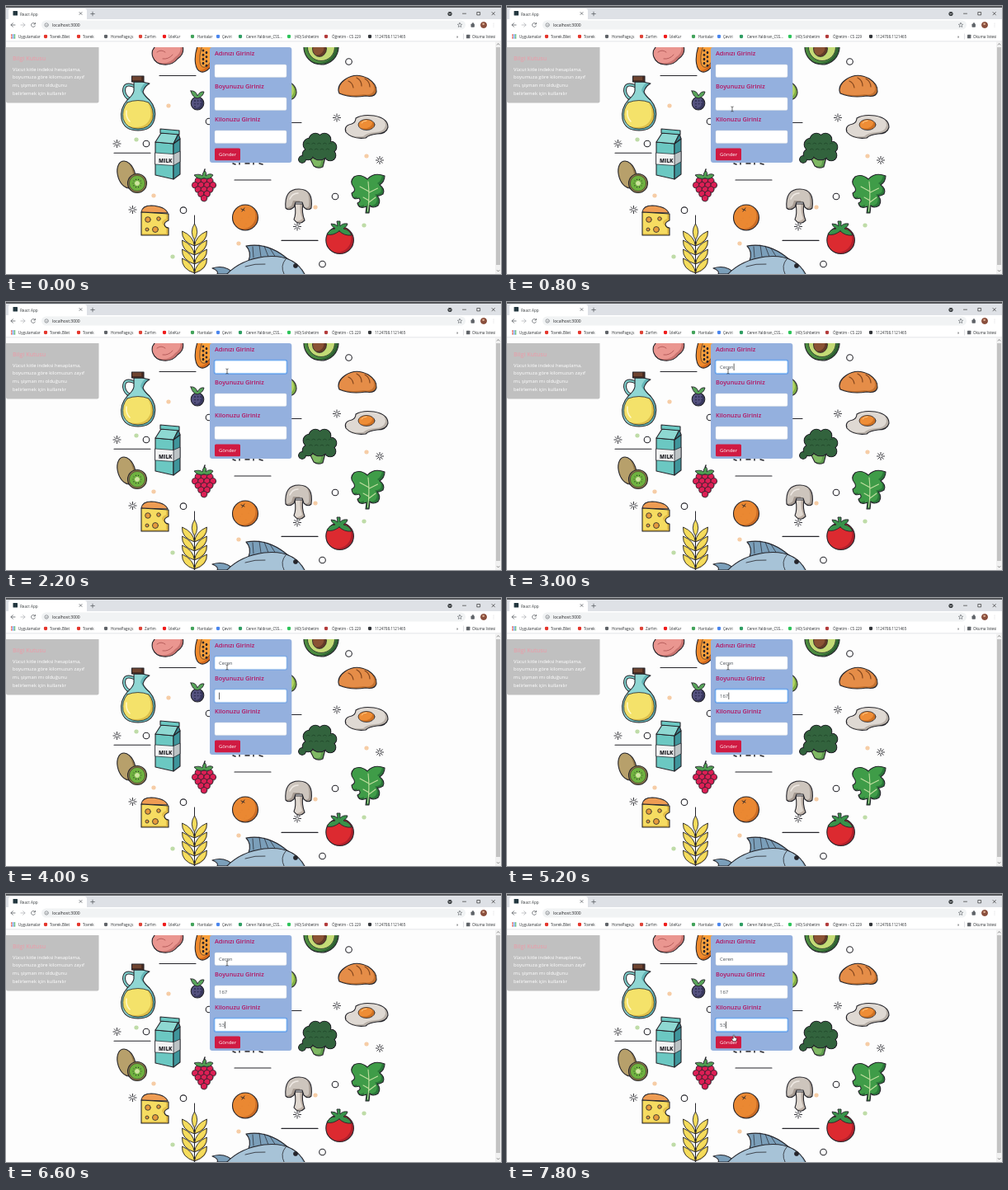
An HTML page with a canvas that plays this animation: 600x325 px, repeating every 8000 ms.

```html
<!DOCTYPE html>
<html lang="tr">
<head>
<meta charset="utf-8">
<title>React App</title>
<style>
html, body { margin: 0; width: 100%; height: 100%; overflow: hidden; background: #fff; }
canvas, svg { position: absolute; left: 0; top: 0; width: 600px; height: 325px; }
text { font-family: "Open Sans", "Noto Sans", sans-serif; white-space: pre; }
</style>
</head>
<body>
<canvas id="page"></canvas>
<svg id="ui" viewBox="0 0 600 325"></svg>
<script>
const INK = '#25252b';
const canvas = document.getElementById('page');
const ui = document.getElementById('ui');
const dpr = window.devicePixelRatio || 1;
canvas.width = 600 * dpr;
canvas.height = 325 * dpr;
const c = canvas.getContext('2d');
c.scale(dpr, dpr);

// ---------- drawing helpers ----------
function rect(x, y, w, h, fill, r = 0) {
  c.fillStyle = fill;
  c.beginPath();
  c.roundRect(x, y, w, h, r);
  c.fill();
}
function line(d, color = INK, width = 1.1) {
  c.strokeStyle = color;
  c.lineWidth = width;
  c.lineCap = c.lineJoin = 'round';
  c.stroke(new Path2D(d));
}
function paint(p, fill, dark, width = 1.1, dx = 3, dy = 2) {
  c.save();
  c.clip(p);
  c.fillStyle = dark || fill;
  c.fill(p);
  if (dark) {
    c.translate(-dx, -dy);
    c.fillStyle = fill;
    c.fill(p);
  }
  c.restore();
  if (!width) return;
  c.strokeStyle = INK;
  c.lineWidth = width;
  c.lineJoin = 'round';
  c.stroke(p);
}
const shape = (d, ...style) => paint(new Path2D(d), ...style);
function oval(x, y, rx, ry, turn, ...style) {
  const p = new Path2D();
  p.ellipse(x, y, rx, ry, turn, 0, 7);
  paint(p, ...style);
}
const dot = (x, y, r, fill) => oval(x, y, r, r, 0, fill, null, 0);
const ring = (x, y) => oval(x, y, 3.8, 3.8, 0, '#fff');
function star(x, y) {
  for (let i = 0; i < 8; i++) {
    const a = i * Math.PI / 4, u = Math.cos(a), v = Math.sin(a);
    line(`M${x + u * 1.6} ${y + v * 1.6}L${x + u * 4.6} ${y + v * 4.6}`, INK, 0.9);
  }
}
function cluster(balls, fill) {
  for (const [x, y, r] of balls) dot(x, y, r + 0.6, INK);
  for (const [x, y, r] of balls) dot(x, y, r - 0.5, fill);
}

// ---------- food wallpaper ----------
function produce() {
  // sausage
  shape('M178 62Q175 54 182 48H214Q217 58 208 64Q202 72 191 71Q181 70 178 62Z', '#ea9690', '#c9736f');
  line('M183 56q5-4 10 0M190 64q7 1 12-5', '#a9504f', 0.8);
  // papaya
  oval(244, 54, 13, 27, 0.3, '#f08a2c', '#d56a1c');
  oval(245, 54, 8.5, 21, 0.3, '#f9a03c', null, 0.6);
  for (let i = 0; i < 8; i++) oval(239 + i % 2 * 4, 54 + i * 2.6, 1.6, 1.8, 0, '#2f2729', null, 0);
  // avocados
  oval(382, 50, 21, 21, 0.2, '#4b8b3f', '#2f6332');
  oval(382, 50, 16.5, 16.5, 0.2, '#c4db76', null, 0.7);
  oval(380, 52, 8.5, 9.5, 0, '#8a5334', '#633a27', 0.8);
  oval(339, 102.5, 13.5, 11, 0.5, '#b5d661', '#7fae45');
  // blackberry
  oval(232, 118, 7.8, 8, 0, '#55527f', '#39385f');
  for (let i = 0; i < 7; i++) dot(229 + i % 3 * 3.6, 115 + (i / 3 | 0) * 3.6, 1.2, '#343359');
  shape('M224 103q6-1 8 6q3-6 8-5q-1 6-8 8q-6-1-8-9Z', '#58a45a', null, 0.9);
  // kiwi
  oval(146, 204.5, 10.5, 17, -0.3, '#b7a06b', '#93794a');
  oval(159, 215, 11.5, 11.5, 0, '#8f7a4a', null);
  oval(159, 215, 9.6, 9.6, 0, '#6fb23f', null, 0.5);
  dot(159, 215, 3, '#cfe4a0');
  for (let i = 0; i < 10; i++) dot(159 + 5 * Math.cos(i * 0.63), 215 + 5 * Math.sin(i * 0.63), 0.8, INK);
  // raspberry
  line('M240 207q-1-5 1-9', INK, 1.6);
  [3, 4, 3, 2, 1].forEach((n, row) => {
    for (let i = 0; i < n; i++)
      oval(240 + (i - (n - 1) / 2) * 7.2, 212 + row * 5.3, 3.8, 3.8, 0, '#dd1f55', '#ac1442', 0.8, 1, 1);
  });
  shape('M240 209q-8 2-12-4q7-2 10 1q0-4 3-6q3 2 1 6q5-4 9-1q-3 6-11 4Z', '#4f9f52', null, 0.9);
  // orange
  oval(290, 256.5, 15.5, 15.5, 0, '#ea8832', '#c86b25');
  line('M285 246l4 2M289 245l-3 4', INK, 0.9);
  for (let i = 0; i < 8; i++) dot(281 + i * 5 % 17, 250 + i * 7 % 18, 0.5, '#a9551a');
  // tomato
  oval(404.6, 284, 16.8, 16.5, 0, '#dc2a30', '#b01f2a');
  shape('M404 273q-8 6-15 4q3-7 10-7q-5-3-5-6q6 0 8 3l-1-6h4l0 6q3-4 9-3q0 3-5 6q7 1 10 8q-9 1-15-5Z', '#38924a', null, 0.9);
  // broccoli
  shape('M366 180l7 14q5 4 11 1l4-15l-12-7Z', '#7fb863', '#5c9a4d');
  cluster([[359, 186, 4.5], [368, 168, 8], [375, 162, 8], [386, 162, 8], [394, 171, 7], [393, 181, 7], [380, 176, 11], [366, 180, 7]], '#32633d');
  for (let i = 0; i < 9; i++) line(`M${364 + i * 3.4} ${167 + i * 7 % 14}q2-2 4 0`, '#1f4429', 0.8);
  // leafy green
  shape('M436 251L437 243Q428 247 426 239Q431 237 428 233Q420 236 419 227Q425 224 421 219Q416 213 422 207Q430 203 438 210Q446 201 459 206Q459 213 453 217Q460 222 457 228Q452 231 450 230Q455 236 451 242Q445 246 441 242L440 251Z', '#3f9c48', '#2a7639');
  line('M438.5 249Q441 230 439 213M440 238l8-6M440 236l-7-4M440.5 226l10-5M440 225l-11-6', '#c1dfa0', 1.1);
}
function pantry() {
  // oil jug
  line('M155 97Q143 92 143 103Q144 110 150 113', INK, 4);
  line('M155 97Q143 92 143 103Q144 110 150 113', '#7fcfcb', 2);
  shape('M155 92H165L174 94Q168 97 166 104Q167 108 174 114Q183 124 180 137Q177 151 160 151Q143 151 140 137Q138 124 147 114Q154 108 155 103Z', '#8fd6d3', '#63b5b7');
  shape('M147 117Q160 112 173 117Q180 125 178 137Q174 149 160 149Q146 149 142 137Q140 125 147 117Z', '#f4e26a', '#dcc04a', 0.8);
  line('M146 127q-1 8 4 13', '#fff7c4', 1.6);
  shape('M152.5 85H167V92H152.5Z', '#6f4430', '#4a2c22');
  // milk carton
  shape('M181 165L203 167V210L181 205Z', '#6bc8c2');
  shape('M203 167L211 161V204L203 210Z', '#3f959b');
  shape('M181 165L188 154L209 155L203 167Z', '#8ed8d2');
  shape('M203 167L209 155L211 161Z', '#39878e');
  shape('M187 149L210 151V156L187 154Z', '#6bc8c2');
  shape('M203 179.5L211 176V189L203 193.5Z', '#bcc3c5', null, 0.7);
  shape('M181 178L203 179.5V193.5L181 192Z', '#f2f3f3', null, 0.7);
  // bread
  shape('M404 106Q400 97 411 89Q424 80 439 88Q450 95 449 104Q447 111 436 109Q418 112 404 106Z', '#e58d48', '#c2702f');
  line('M415 91q5 2 6 8M425 87q6 3 6 10M435 88q6 4 6 10', '#84471e', 1.2);
  // fried egg
  shape('M412 153Q409 145 419 143Q424 141 424 136Q432 131 446 133Q463 136 463 147Q461 155 450 155Q440 156 436 160Q420 162 412 153Z', '#dfd9d3', '#b9b1a9');
  oval(437, 144, 10, 6.5, 0, '#ee8d36', '#cf7122', 0.8);
  line('M431 142q2-3 6-3', '#ffcf8c', 1);
  // mushroom
  shape('M350 240Q352 252 349 259Q355 267 362 260Q358 250 360 240Z', '#e0d8d0', '#bdb0a6');
  shape('M339 245Q337 222 355 222Q373 222 370 245Q366 249 361 244L359 238H351L349 244Q343 249 339 245Z', '#cdc5bd', '#a69b92');
  line('M344 234q3-7 10-7', '#efe9e4', 1.5);
  // cheese
  shape('M164 250Q165 242 176 242Q193 243 196 251Z', '#ee9c53');
  shape('M164 250L197 252V260Q192 262 192 265Q193 269 197 269V278H164Z', '#f6dc61', '#e2bd48');
  for (const [x, y, r] of [[172, 259, 3.3], [185, 258, 2.3], [181, 271, 3.5], [171, 271, 2]])
    oval(x, y, r, r, 0, '#e59b3d', null, 0.8);
  // wheat
  line('M228.5 325V254', INK, 1);
  for (let y = 311; y > 271; y -= 11) for (const s of [-1, 1]) {
    const x = k => 228.5 + s * k;
    shape(`M${x(0)} ${y + 13}Q${x(1)} ${y + 1} ${x(15)} ${y - 5}Q${x(16)} ${y + 8} ${x(0)} ${y + 13}Z`, '#f5dc5c', '#d9b53c', 0.9, 1, 1);
  }
  shape('M228.5 284Q222 274 228.5 264Q235 274 228.5 284Z', '#f5dc5c', null, 0.9);
  // fish
  shape('M294 309Q298 298 291 291Q318 286 343 308Z', '#7b9fba', '#61859f');
  line('M300 305l-1-13M309 304l-2-14M318 304l-5-13M327 305l-7-11', INK, 0.7);
  shape('M250 318Q266 313 277 325H256Q258 321 250 318Z', '#7b9fba');
  shape('M266 327Q283 308 313 304Q350 300 363 327Z', '#a7c3d7', '#86a8c0');
  line('M339 307q-7 8-2 18M290 316q12-4 24-3', INK, 0.8);
  oval(351, 315, 2.6, 2.6, 0, INK, null, 0.8);
}
function wallpaper() {
  c.save();
  c.beginPath();
  c.rect(0, 50, 593, 275);
  c.clip();
  for (const [x, y] of [[197, 121], [437, 182], [179, 230], [282, 288], [375, 244]]) dot(x, y, 2.8, '#f6cda6');
  for (const [x, y] of [[202, 304], [434, 266], [158, 162]]) dot(x, y, 2.8, '#bfdca8');
  line('M186 84.5H230M131 178.3H175M277 211H321M334 284.4H378M320 141.5H358');
  line('M275 191l3 1M283 190v2M290 191h5M300 190v2M307 191l4 1', INK, 1.5);
  produce();
  pantry();
  for (const [x, y] of [[415.5, 67.5], [170, 167], [215, 247.7], [399, 231], [383.5, 313], [246, 140]]) ring(x, y);
  for (const [x, y] of [[134.5, 167], [153.5, 247], [401, 135.5], [453, 187], [353, 267.5]]) star(x, y);
  c.restore();
}

// ---------- browser window ----------
function browser() {
  const gray = '#5f6368';
  rect(0, 0, 600, 16, '#dee1e6');
  rect(0, 0, 600, 2, '#55575b');
  rect(3, 3, 95, 14, '#fff', [3, 3, 0, 0]);
  rect(8.5, 6, 5.5, 5.5, '#23373f', 0.5);
  line('M89 7.5l3 3M92 7.5l-3 3M102.8 9.5h4.5M105 7.2v4.6', gray, 0.8);
  dot(538, 9.5, 2.8, '#3c4043');
  line('M536.8 9l1.2 1.2l1.2-1.2', '#fff', 0.6);
  line('M553.5 9.2h4M571.2 7.5h3.4v3.4h-3.4ZM589 7.5l3.4 3.4M592.4 7.5l-3.4 3.4', '#333', 0.7);
  rect(0, 16, 600, 27, '#fff');
  rect(43, 17.5, 514, 11, '#f1f3f4', 5.5);
  line('M11 23H6M8.3 20.7L6 23l2.3 2.3', gray, 0.8);
  line('M18 23h5M20.7 20.7L23 23l-2.3 2.3', '#b4b7ba', 0.8);
  line('M35.2 21.6A2.5 2.5 0 1 0 35.4 24M35.4 20.4v1.6h-1.6', gray, 0.8);
  line('M51.3 23a2.2 2.2 0 1 1-4.4 0a2.2 2.2 0 1 1 4.4 0M49.1 22.9v1.1', gray, 0.6);
  line('M550 20.4l.8 1.7l1.9.2l-1.4 1.3l.4 1.9l-1.7-1l-1.7 1l.4-1.9l-1.4-1.3l1.9-.2Z', gray, 0.6);
  rect(563.5, 21.4, 4.4, 4.4, gray, 0.8);
  dot(566, 21.2, 1.1, gray);
  dot(579, 23, 4, '#8a4f3d');
  dot(578.6, 21.7, 1.5, '#d9a98c');
  for (let i = -1; i < 2; i++) dot(591, 23 + i * 2, 0.6, gray);
  for (let i = 0; i < 9; i++)
    rect(6 + i % 3 * 1.9, 34.3 + (i / 3 | 0) * 1.9, 1.4, 1.4, ['#e04f43', '#4a8af4', '#35a552'][i % 3]);
  const icons = [[48, '#e5362c'], [88, '#e5362c'], [121, '#5f6368'], [163, '#dd4438'], [192, '#f01c1c'], [226, '#43a35b'],
    [257, '#4a86ee'], [284, '#2f9d62'], [343, '#2fc45b'], [388, '#b33b3b'], [441, '#33363a']];
  for (const [x, color] of icons) dot(x, 37, 2.4, color);
  rect(554, 33.5, 0.6, 7, '#c9ccd0');
  rect(558, 34.7, 4.4, 4.6, gray, 0.6);
  rect(0, 42.6, 600, 0.6, '#dadce0');
  rect(593, 43, 7, 282, '#f1f1f1');
  rect(594, 50, 5, 264, '#c3c3c3');
  line('M595.2 47l1.4-1.5l1.4 1.5M595.2 320.5l1.4 1.5l1.4-1.5', '#666', 0.7);
}
function panels() {
  rect(0, 50, 112.5, 67.5, '#c0c0c0', [0, 0, 2, 2]);
  rect(247, 50, 99.3, 140, '#94b0de', 3);
  rect(253, 172.5, 31, 14.8, '#d01a42', 1.6);
}

// ---------- overlay ----------
function el(name, attrs) {
  const node = document.createElementNS('http://www.w3.org/2000/svg', name);
  for (const k in attrs) node.setAttribute(k, attrs[k]);
  return ui.appendChild(node);
}
function label(str, x, y, size, fill, weight = 400) {
  const node = el('text', { x, y, 'font-size': size, fill, 'font-weight': weight });
  node.textContent = str;
  return node;
}

const TOPS = [71, 111, 151];
const FINAL = ['Ceren', '167', '53'];
rect(0, 0, 600, 325, '#fdfdfd');
wallpaper();
browser();
panels();

label('React App', 17, 11.5, 4.6, '#3c4043');
label('localhost:3000', 56, 25, 5, '#202124');
const marks = [['Uygulamalar', 15], ['Tovrek.Bilet', 53], ['Tovrek', 93], ['HomePage.js', 127], ['Zarfım', 168], ['İzleKur', 197],
  ['Haritalar', 232], ['Çeviri', 262], [FINAL[0] + ' Yaldıran_CSS...', 291], ['(40) Sohbetim', 350],
  ['Öğretim - CS 229', 395], ['1124708.1121465', 447], ['»', 546], ['Okuma listesi', 565]];
for (const [str, x] of marks) label(str, x, 38.8, 4.5, '#2b2e31');
label('MILK', 185, 189.5, 6.4, INK, 800);
label('Bilgi Kutusu', 8, 65.5, 7, '#e3a2ac', 600);
['Vücut kitle indeksi hesaplama,', 'boyumuza göre kilomuzun zayıf', 'mı, şişman mı olduğunu', 'belirlemek için kullanılır']
  .forEach((str, i) => label(str, 8, 78.6 + i * 9.7, 5.9, '#fff', 500));
['Adınızı Giriniz', 'Boyunuzu Giriniz', 'Kilonuzu Giriniz']
  .forEach((str, i) => label(str, 253, 60 + i * 40, 7.3, '#b5125f', 600));
label('Gönder', 258, 182, 6, '#fff');

const fields = TOPS.map(y => {
  const box = { x: 253, y, width: 87, height: 15.4, rx: 1.6 };
  const glow = el('rect', { ...box, fill: 'none', stroke: '#2f86f0', 'stroke-width': 2.6, 'stroke-opacity': 0.55 });
  el('rect', { ...box, fill: '#fff', stroke: '#ced4da', 'stroke-width': 0.4 });
  const edge = el('rect', { ...box, fill: 'none', stroke: '#80bdff', 'stroke-width': 0.7 });
  return { glow, edge, text: label('', 258, y + 10.4, 6, '#495057') };
});
const caret = el('rect', { width: 0.7, height: 8.4, fill: '#222' });
const pointers = {
  beam: el('path', { d: 'M-1.6-3Q0-3 0-2Q0-3 1.6-3M0-2V2M-1.6 3Q0 3 0 2Q0 3 1.6 3', fill: 'none', stroke: '#333', 'stroke-width': 0.7 }),
  arrow: el('path', { d: 'M0 0V7L1.7 5.5L2.8 8L3.9 7.5L2.8 5.1H5Z', fill: '#fff', stroke: '#222', 'stroke-width': 0.6 }),
  hand: el('path', { d: 'M-.8-2.6Q0-3.6 .8-2.6V0L3 .5Q3.8 1 3.2 3L2.6 4.6H-1L-2.8 1.6Q-2.4 .6-.8 1.6Z', fill: '#fff', stroke: '#222', 'stroke-width': 0.6 })
};

// time, field, typed characters, caret shown, focus strength
const STEPS = [[0, -1, 0, 0, 0], [1400, 0, 0, 1, 0.5], [1600, 0, 0, 1, 1], [2200, 0, 0, 0, 1], [2600, 0, 1, 1, 1], [2800, 0, 3, 1, 1],
  [3000, 0, 5, 1, 1], [3600, 0, 5, 0, 1], [4000, 1, 0, 1, 0.5], [4200, 1, 0, 1, 1], [4600, 1, 1, 1, 1], [5000, 1, 2, 1, 1],
  [5200, 1, 3, 1, 1], [5600, 2, 0, 1, 0.5], [5800, 2, 0, 1, 1], [6200, 2, 1, 1, 1], [6400, 2, 2, 1, 1],
  [7200, 2, 2, 0, 1], [7600, 2, 2, 1, 1]];
const PATH = [[200, 290, 185], [800, 273, 125], [1200, 268, 84], [7000, 268, 84], [7800, 275, 174]];

function pointerAt(t) {
  const i = PATH.findIndex(p => p[0] > t);
  if (i < 0) return PATH[PATH.length - 1].slice(1);
  const [t0, x0, y0] = PATH[i - 1], [t1, x1, y1] = PATH[i];
  const k = (t - t0) / (t1 - t0);
  return [x0 + (x1 - x0) * k, y0 + (y1 - y0) * k];
}
function render(time) {
  const t = Math.floor(time % 8000 / 200) * 200;
  const [, active, typed, blink, focus] = STEPS.findLast(s => s[0] <= t);
  fields.forEach((f, i) => {
    const str = i < active ? FINAL[i] : i === active ? FINAL[i].slice(0, typed) : '';
    if (f.text.textContent !== str) f.text.textContent = str;
    const lit = i === active ? focus : i === active - 1 ? 1 - focus : 0;
    f.glow.setAttribute('opacity', lit);
    f.edge.setAttribute('opacity', lit);
  });
  caret.setAttribute('opacity', blink);
  if (blink) {
    caret.setAttribute('x', 258 + (typed ? fields[active].text.getComputedTextLength() + 0.2 : 0));
    caret.setAttribute('y', TOPS[active] + 3.6);
  }
  let kind = '';
  if (t >= 200) {
    const [x, y] = pointerAt(t);
    kind = y > 171 && y < 188 && x < 285 ? 'hand' : TOPS.some(v => y > v && y < v + 16) ? 'beam' : 'arrow';
    pointers[kind].setAttribute('transform', `translate(${x} ${y})`);
  }
  for (const k in pointers) pointers[k].setAttribute('visibility', k === kind ? 'visible' : 'hidden');
}
const start = performance.now();
function loop() {
  render(performance.now() - start);
  requestAnimationFrame(loop);
}
loop();
</script>
</body>
</html>
```
